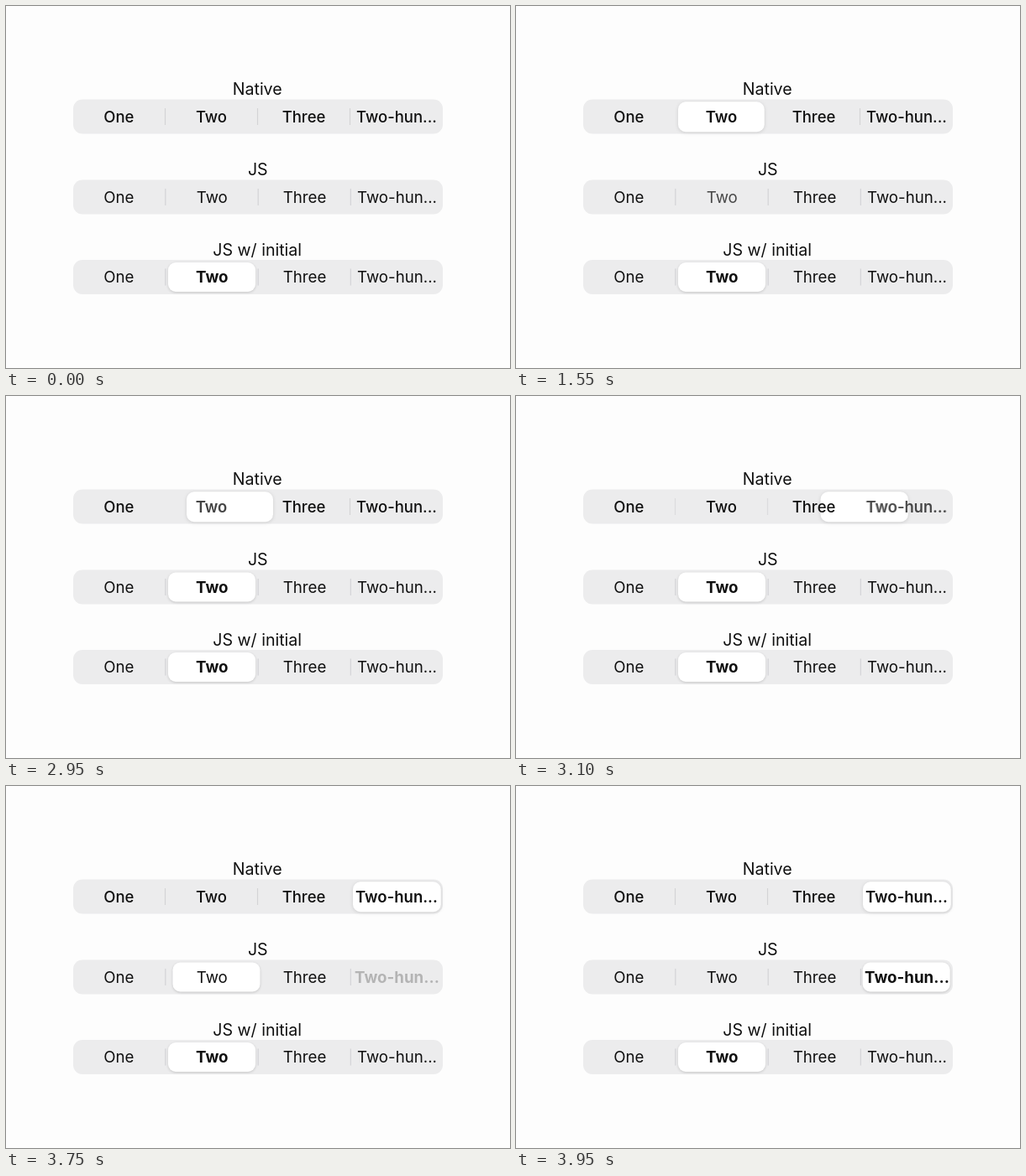
Animation of 600x432 px, one loop 4.55 s. Source, as an HTML page:

```html
<!DOCTYPE html>
<html lang="en">
<head>
<meta charset="utf-8">
<title>Segmented controls</title>
<style>
  html, body { margin: 0; width: 100%; height: 100%; overflow: hidden; background: #fdfdfd; }
  svg { display: block; width: 100%; height: 100%; }
  text { font-family: Inter, Roboto, sans-serif; font-size: 18.7px; text-anchor: middle; fill: #101010; }
  .title { font-size: 19.6px; }
  .track { fill: #ececed; }
  .divider { fill: #d3d3d6; }
  .pill { fill: #fff; filter: drop-shadow(0 1px 1.5px rgba(0, 0, 0, .16)); }
  .native .pill { filter: drop-shadow(0 1px 2px rgba(0, 0, 0, .13)); }
  .bold { font-weight: 700; }
  .native .plain { font-weight: 500; font-size: 18.5px; }
  .native .bold { font-weight: 600; font-size: 18.5px; }
</style>
</head>
<body>
<svg viewBox="0 0 600 432"></svg>
<script>
const LOOP = 4550, TICK = 50;
const LABELS = ['One', 'Two', 'Three', 'Two-hun...'];
const svg = document.querySelector('svg');

function add(parent, tag, attrs, text = '') {
  const el = document.createElementNS('http://www.w3.org/2000/svg', tag);
  for (const key in attrs) el.setAttribute(key, attrs[key]);
  el.textContent = text;
  return parent.appendChild(el);
}

function control({ title, titleX, top, kind, centers, dividerX, pillY, pillH }) {
  const g = add(svg, 'g', { class: kind });
  add(g, 'text', { class: 'title', x: titleX, y: top - 5.5 }, title);
  add(g, 'rect', { class: 'track', x: 80, y: top, width: 440, height: 41, rx: 11 });
  const dividers = dividerX.map(x =>
    add(g, 'rect', { class: 'divider', x: x - 0.6, y: top + 10.5, width: 1.2, height: 20 }));
  const pill = add(g, 'rect', { class: 'pill', x: 193, y: pillY, width: 104, height: pillH, rx: 9 });
  const label = cls => LABELS.map((s, i) =>
    add(g, 'text', { class: cls, x: centers[i], y: top + 27.2 }, s));
  return { dividers, pill, plain: label('plain'), bold: label('bold') };
}

const js = { kind: 'js', centers: [134.3, 245.3, 355.5, 465.5], dividerX: [189.8, 300.2, 410.3], pillH: 35 };
const native = control({
  title: 'Native', titleX: 299.2, top: 111.5, kind: 'native', pillY: 114.3, pillH: 35.9,
  centers: [134.3, 244.5, 354.5, 465], dividerX: [189.5, 299.5, 409.5]
});
const second = control({ ...js, title: 'JS', titleX: 299.8, top: 207.5, pillY: 210.5 });
const third = control({ ...js, title: 'JS w/ initial', titleX: 299.2, top: 303, pillY: 306 });

const clamp = v => Math.min(1, Math.max(0, v));
const ramp = (t, from, to) => clamp((t - from) / (to - from));
const mix = (a, b, p) => a + (b - a) * p;
const easeInOut = p => p < 0.5 ? 4 * p ** 3 : 1 - 4 * (1 - p) ** 3;
const fade = (el, v) => el.setAttribute('opacity', v);

// Critically damped spring, settled after 485 ms
function spring(ms) {
  if (ms <= 0) return 0;
  if (ms >= 485) return 1;
  const k = ms * 0.0152;
  return 1 - (1 + k) * Math.exp(-k);
}

// Label dims while pressed, then recovers
function press(t, start) {
  const down = ramp(t, start - 50, start + 100), up = ramp(t, start + 100, start + 200);
  return up > 0 ? mix(0.25, 1, up) : mix(1, 0.25, down);
}

function setPill({ pill }, x, width, opacity) {
  pill.setAttribute('x', x);
  pill.setAttribute('width', width);
  fade(pill, opacity);
}

function setLabel({ plain, bold }, i, boldness, opacity = 1) {
  fade(plain[i], (1 - boldness) * opacity);
  fade(bold[i], boldness * opacity);
}

function drawNative(t) {
  const shown = ramp(t, 550, 750);
  const slide = spring(t - 2915);
  const leave = ramp(t, 2900, 3050), arrive = ramp(t, 3000, 3250);
  setPill(native, mix(193, 413, slide), mix(102.7, 104.7, slide), shown);
  setLabel(native, 0, 0);
  setLabel(native, 1, shown * (1 - leave));
  setLabel(native, 2, 0);
  setLabel(native, 3, arrive);
  const swap = ramp(t, 2950, 3200);
  const near = 1 - shown * (1 - swap);
  [near, near, 1 - swap].forEach((v, i) => fade(native.dividers[i], v));
}

function drawSecond(t) {
  const first = t >= 1650, moved = t >= 3750;
  const slide = easeInOut(ramp(t, 3705, 3950));
  setPill(second, mix(193, 412.7, slide), 104, first ? 1 : 0);
  setLabel(second, 0, 0);
  setLabel(second, 1, first && !moved ? 1 : 0, press(t, 1550));
  setLabel(second, 2, 0);
  setLabel(second, 3, moved ? 1 : 0, press(t, 3650));
}

function draw(t) {
  drawNative(t);
  drawSecond(t);
}

LABELS.forEach((_, i) => setLabel(third, i, i === 1 ? 1 : 0));

const began = performance.now();
function frame() {
  const t = (performance.now() - began) % LOOP;
  draw(Math.floor(t / TICK) * TICK);
  requestAnimationFrame(frame);
}
frame();
</script>
</body>
</html>
```
